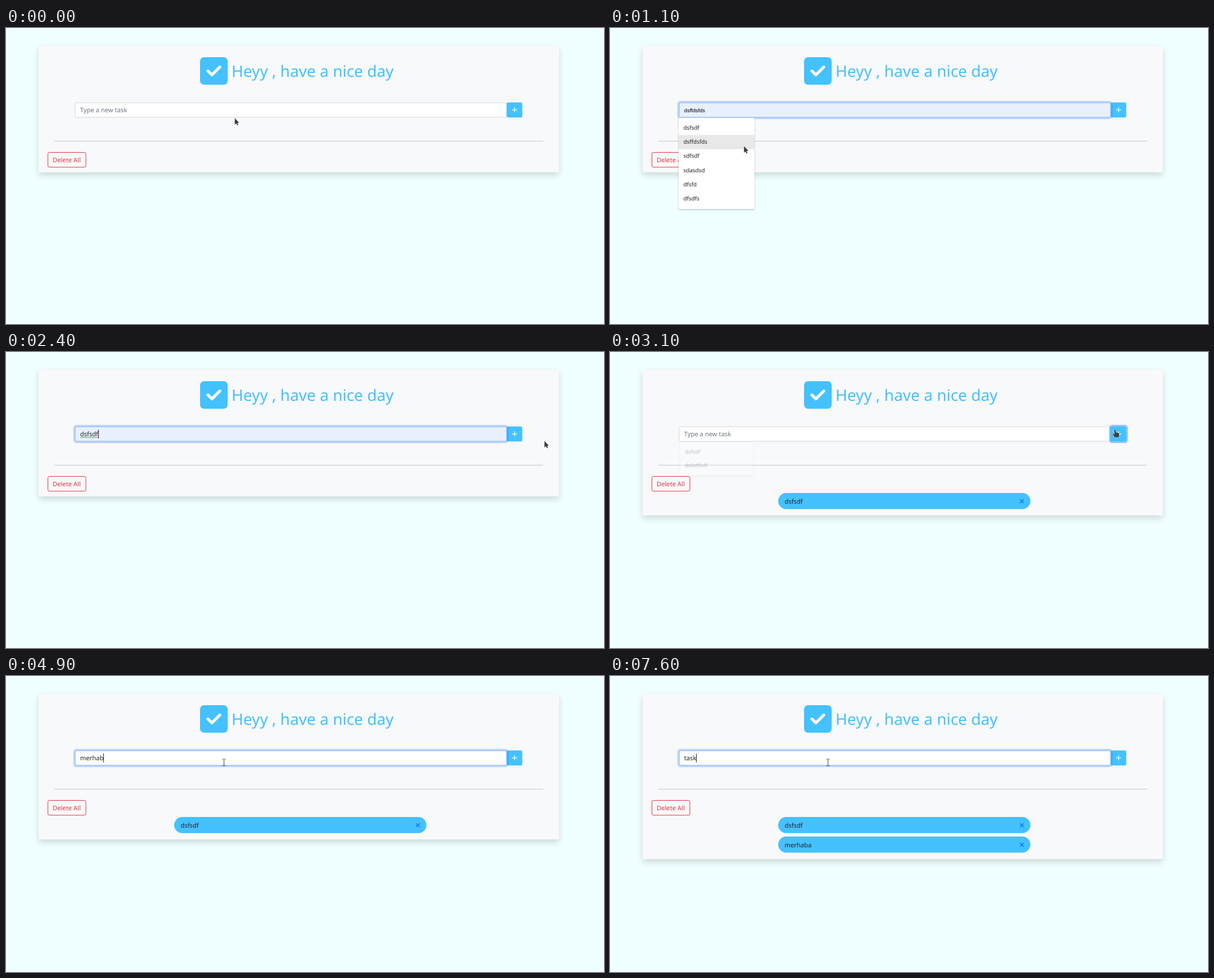
These frames come from a looping animation (1063 px wide and 527 px high, 8000 ms). An HTML page:

```html
<!DOCTYPE html>
<html lang="en">
<head>
<meta charset="utf-8">
<title>Task list</title>
<style>
  html, body { margin: 0; width: 100%; height: 100%; overflow: hidden; background: #f0ffff; }
  svg { display: block; position: absolute; left: 0; top: 0; }
  text { font: 11.2px "Noto Sans", sans-serif; fill: #212529; text-rendering: geometricPrecision; white-space: pre; }
  #card { position: absolute; left: 57.5px; top: 31px; width: 925.5px; border-radius: 2.8px;
    background: #f8f9fa; box-shadow: 0 5.6px 11.2px rgba(0, 0, 0, .15); }
  .blue { fill: #44c1ff; }
  .mark { fill: none; stroke-linecap: round; stroke-linejoin: round; }
  #title { font-size: 28px; font-weight: 500; fill: #44c1ff; }
  #delete { fill: #dc3545; }
  #value.hint { fill: #6c757d; }
  #value.preview { font: 9.33px "Liberation Sans", Arial, sans-serif; fill: #000; }
  #menu { transform-box: fill-box; transform-origin: center; }
  #panel { fill: #fff; filter: drop-shadow(0 1px 1.2px rgba(0, 0, 0, .3)); }
  #menu text { font-size: 9.9px; font-weight: 500; fill: #1f1f1f; }
</style>
</head>
<body>
<div id="card"></div>
<svg width="1063" height="527" viewBox="0 0 1063 527">
  <rect class="blue" x="345" y="52" width="49" height="49" rx="7"/>
  <path class="mark" d="M359 76.5l7 7 14-14" stroke="#fff" stroke-width="5.3"/>
  <text id="title" x="401" y="87">Heyy , have a nice day</text>

  <rect id="field" x="123" y="133" width="767" height="26" rx="2.5" stroke="#ced4da"/>
  <rect class="blue" x="890" y="132.6" width="27.7" height="26.6" rx="2.8"/>
  <path class="mark" d="M900.3 145.8h7.4M904 142.1v7.4" stroke="#fff" stroke-width="1.5"/>
  <g id="fieldRing" fill="none">
    <rect x="121.1" y="131.1" width="770.8" height="29.8" rx="4" stroke="#0d6efd" stroke-opacity=".25" stroke-width="2.8"/>
    <rect x="123" y="133" width="767" height="26" rx="2.5" stroke="#86b7fe"/>
  </g>
  <rect id="buttonRing" x="888.6" y="131.2" width="30.5" height="29.4" rx="4" fill="none" stroke="#3184fd" stroke-opacity=".5" stroke-width="2.8"/>
  <text id="value" x="131.8" y="150"></text>
  <path id="squiggle" fill="none" stroke="#f22" stroke-width=".8"/>
  <rect id="caret" y="138" width="1" height="16" fill="#222"/>

  <rect x="86" y="201" width="869" height="1" fill="#c2c4c6"/>
  <rect x="74.5" y="221.5" width="67.5" height="26.3" rx="2.8" fill="none" stroke="#dc3545"/>
  <text id="delete" x="83" y="239">Delete All</text>
  <g id="tasks"></g>

  <g id="menu">
    <rect id="panel" x="122" y="160" width="135" rx="2"/>
    <rect id="hover" x="122" width="135" height="25.2" fill="#e8e8e8"/>
    <g id="options"></g>
  </g>

  <g id="pointer">
    <path id="arrow" d="M0 0V12.2L2.7 9.9 4.5 13.6 6.6 12.6 5 9.2 8.2 8.7Z" fill="#3d3d3d" stroke="#fff" stroke-width=".5" stroke-opacity=".7"/>
    <path id="beam" d="M-3-6.2Q-.3-6.2 0-5.2 .3-6.2 3-6.2M0-5.2V5.2M-3 6.2Q-.3 6.2 0 5.2 .3 6.2 3 6.2" fill="none" stroke="#444"/>
    <path id="hand" d="M-1.2 1Q0-1 1.4 1L2 5 6.8 6Q8 6.4 7.8 8L7 14H0L-3.4 9.4Q-4-7.5-2.6 7L-.5 8.6Z" fill="#3d3d3d" stroke="#fff" stroke-width=".5" stroke-opacity=".7"/>
  </g>
</svg>
<script>
const LOOP = 8000, STEP = 100, ROW = 25.2, FIRST_ROW = 165.3;
const $ = id => document.getElementById(id);
const show = (id, on) => { $(id).style.display = on ? '' : 'none'; };

const words = ['dsfsdf', 'dsffdsfds', 'sdfsdf', 'sdasdsd', 'dfsfd', 'dfsdfs'];
const matches = ['dsfsdf', 'dsfsdfsdf'];
const added = [[3100, 'dsfsdf'], [5500, 'merhaba']];

// Each track lists [time, value]; a value holds until the next one.
const typed = [[0, ''], [2100, 'dsfsdf'], [3100, ''],
  ...[...'merhaba'].map((c, i, all) => [4400 + i * 100, all.slice(0, i + 1).join('')]),
  [5500, ''], [7200, 't'], [7300, 'ta'], [7400, 'tas'], [7600, 'task']];
const focus = [[0, ''], [400, 'field'], [2900, 'button'], [3700, 'field']];
const caretOn = [[0, 1], [4300, 0], [4400, 1], [5700, 0], [6300, 1], [6900, 0], [7200, 1]];
const misspelt = [[0, 0], [2100, 1], [3100, 0], [5100, 1], [5500, 0]];
const menuAlpha = [[0, 0], [500, .25], [600, 1], [2100, .25], [2200, 0], [2600, .25], [2700, 1],
  [3100, .25], [3200, 0], [3800, .25], [3900, 1], [4400, .25], [4500, 0]];
const path = [[0, 406.5, 160], [100, 405, 159.5], [200, 401.5, 154], [400, 401.5, 154], [1100, 238, 210],
  [1500, 225, 234], [2000, 205, 178], [2100, 205, 178], [2400, 957, 158], [2900, 897.5, 138],
  [3100, 897.5, 138], [3700, 387.5, 154], [LOOP, 387.5, 154]];

const at = (track, t) => track.filter(k => k[0] <= t).pop()[1];

function pointerAt(t) {
  const i = path.findIndex(k => k[0] > t);
  const [t0, x0, y0] = path[i - 1], [t1, x1, y1] = path[i];
  const u = (t - t0) / (t1 - t0), e = u * u * (3 - 2 * u);
  return [x0 + (x1 - x0) * e, y0 + (y1 - y0) * e];
}

const pill = ([, name], i) => {
  const y = 251 + i * 34.7;
  return `<g><rect class="blue" x="299" y="${y}" width="448.3" height="28.8" rx="14.4"/>
    <text x="310.5" y="${y + 19}">${name}</text>
    <path class="mark" d="M729 ${y + 11.7}l6 6m0-6l-6 6" stroke="#0d6efd" stroke-width="1.4"/></g>`;
};
$('tasks').innerHTML = added.map(pill).join('');

function drawMenu(alpha, list, row) {
  show('menu', alpha);
  $('menu').style.opacity = alpha;
  $('menu').style.transform = alpha < 1 ? 'scale(.957)' : 'none';
  $('panel').setAttribute('height', 11.3 + list.length * ROW);
  $('options').innerHTML = list.map((w, i) =>
    `<text x="130.5" y="${Math.round(181 + i * ROW)}">${w}</text>`).join('');
  show('hover', row >= 0);
  $('hover').setAttribute('y', FIRST_ROW + Math.max(row, 0) * ROW);
}

function drawField(t, preview) {
  const text = at(typed, t), active = at(focus, t);
  const filled = preview || (t >= 2100 && t < 3100);
  const value = $('value');
  value.textContent = preview || text || 'Type a new task';
  value.setAttribute('class', preview ? 'preview' : text ? '' : 'hint');
  $('field').setAttribute('fill', filled ? '#e8f0fe' : '#fff');
  show('fieldRing', active === 'field');
  show('buttonRing', active === 'button');

  const width = text ? value.getComputedTextLength() : 0;
  show('caret', active === 'field' && !preview && at(caretOn, t));
  $('caret').setAttribute('x', Math.floor(132 + width));
  show('squiggle', at(misspelt, t));
  $('squiggle').setAttribute('d', 'M132 151.6' + 'l1 1 1-1'.repeat(Math.round(width / 2)));
}

function drawPointer(x, y) {
  const inRow = y > 132.5 && y < 159.3;
  const shape = inRow && x > 890 && x < 918 ? 'hand' : inRow && x > 123 && x <= 890 ? 'beam' : 'arrow';
  for (const id of ['arrow', 'beam', 'hand']) show(id, id === shape);
  $('pointer').setAttribute('transform', `translate(${x} ${y})`);
}

function draw(t) {
  const [x, y] = pointerAt(t);
  const alpha = at(menuAlpha, t);
  const list = t >= 2500 && t < 3300 ? matches : words;
  const over = alpha === 1 && x > 122 && x < 257 && y > FIRST_ROW;
  const row = over ? Math.floor((y - FIRST_ROW) / ROW) : -1;
  drawMenu(alpha, list, row);
  drawField(t, list[row]);
  drawPointer(x, y);

  const count = added.filter(k => k[0] <= t).length;
  [...$('tasks').children].forEach((g, i) => { g.style.display = i < count ? '' : 'none'; });
  $('card').style.height = 225.6 + count * 34.7 + 'px';
}

const start = performance.now();
let last = -1;
function tick() {
  const t = Math.floor((performance.now() - start) % LOOP / STEP) * STEP;
  if (t !== last) draw(last = t);
  requestAnimationFrame(tick);
}
tick();
</script>
</body>
</html>
```
